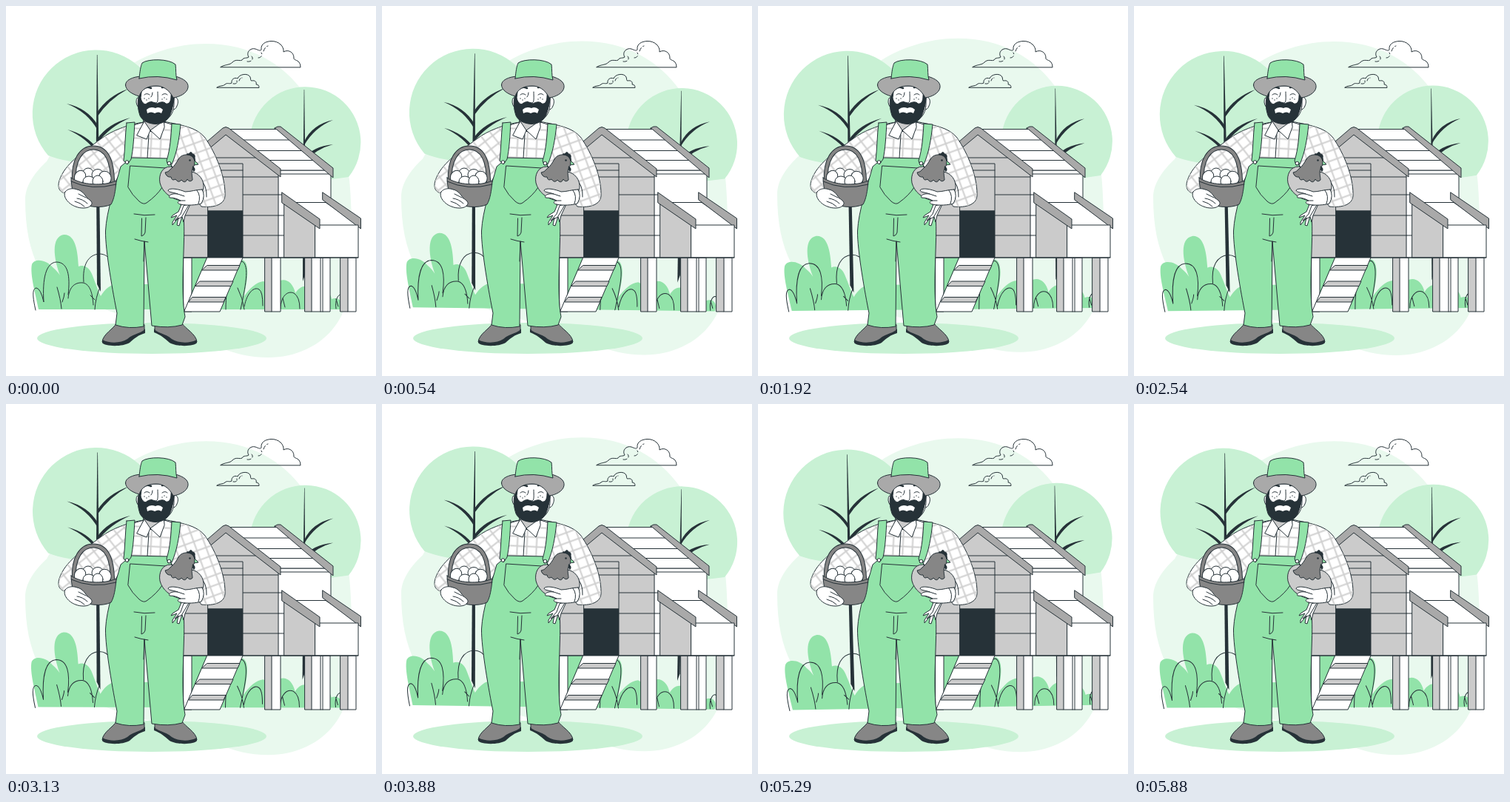
These frames come from a looping animation (500 px wide and 500 px high, 5.93 s). An HTML page:

```html
<!DOCTYPE html>
<html lang="en">
<head>
<meta charset="utf-8">
<title>Farmer with hen</title>
<style>
html, body { margin: 0; width: 100%; height: 100%; overflow: hidden; background: #fff; }
svg { display: block; width: 100vw; height: 100vh; fill: none; stroke: #263238; stroke-linejoin: round; stroke-linecap: round; }
.n { stroke: none; }
.mint { fill: #92e3a9; }
.pale { fill: #c8f1d4; stroke: none; }
.w { fill: #fff; }
.g1 { fill: #cbcbcb; }
.g2 { fill: #a9a9a9; }
.g3 { fill: #868686; }
.d { fill: #263238; }
</style>
</head>
<body>
<svg viewBox="0 0 500 500">
  <defs>
    <pattern id="check" width="13" height="13" patternUnits="userSpaceOnUse" patternTransform="translate(178 159) rotate(3)">
      <path d="M0 6.5H13M6.5 0V13" stroke="#cfcfcf" stroke-width="2"/>
    </pattern>
    <pattern id="checkL" href="#check" patternTransform="translate(120 190) rotate(52)"/>
    <pattern id="checkR" href="#check" patternTransform="translate(262 190) rotate(-20)"/>
  </defs>

  <path id="blob" class="n" fill="#e9f9ee" d="M270 51C330 51 375 78 403 118C435 160 460 200 464 235C467 265 468 310 466 350C466 390 458 415 445 432C425 460 390 475 355 475C300 475 280 452 225 437C165 420 90 405 45 355C32 330 26 300 26 262C26 243 38 226 55 210C90 150 110 120 160 85C190 64 230 51 270 51Z"/>

  <g id="plants">
    <path class="pale" d="M57 202A86 86 0 1 1 189 199Q170 213 123 214Q80 211 57 202Z"/>
    <path class="pale" d="M345 230A75 75 0 1 1 463 231Q450 233 440 234Z"/>
    <path class="mint n" d="M44 410C40 390 32 362 35 349C39 340 55 343 63 353C68 357 71 361 73 364C64 340 61 312 78 309C95 308 97 335 98 352C104 349 112 352 116 362C121 374 124 384 128 392C134 382 142 376 149 376H236V340H272L290 380C300 364 307 346 319 343C330 346 327 370 321 393C330 381 338 373 348 372L361 379C371 364 387 369 391 388C399 375 412 375 421 392C427 380 438 384 440 396C450 392 456 400 452 410Z"/>
    <path d="M40 411C36 393 35 382 41 381Q47 382 51 400C49 368 54 347 68 346C84 346 87 365 84 390M75 409Q74 397 69 380M76 400Q79 392 79 388M84 395C85 381 92 373 104 374C114 376 117 389 118 404M105 373C103 350 111 336 126 335C141 335 147 350 147 370M120 410Q121 394 127 380M120 397L114 391"/>
    <path d="M297 410C297 375 305 348 319 345C330 350 323 382 317 410M322 410Q320 395 313 381M322 406C326 386 336 379 342 383Q347 386 347 405M371 409C371 393 380 384 389 388Q397 393 397 409M377 407L374 395M446 409C444 396 450 387 454 391M449 406L446 396"/>
    <g class="d n">
      <path d="M122.900 66H123.500L125.500 200L128 386L123 376L121.700 200Z"/>
      <path d="M82 132Q110 138 124 161V168Q110 143 82 132ZM165 112Q137 122 123 144V150Q139 126 165 112ZM83 167Q110 174 124 194V200Q109 178 83 167ZM168 151Q137 159 123 180V186Q140 163 168 151Z"/>
      <path d="M402.700 113H403.200L404.500 230V362L401 372L401.500 220Z"/>
      <path d="M442 154Q414 160 403 183V188Q417 164 442 154ZM442 187Q414 190 403 206V211Q419 193 442 187ZM387 178Q399 184 404 195V200Q398 186 387 178Z"/>
    </g>
  </g>

  <ellipse class="pale" cx="197" cy="449" rx="155" ry="21"/>

  <path d="M290 82.500C295 79 303 80 306 76C311 71 316 75 319 73C321 69 326 71 328 69C324 63 330 56 337 58C342 60 344 61 345 59C344 51 351 48 358 47.500C369 47 376 55 375 62C382 58 389 63 389 70C388 73 394 73 396 76Q398 78 398 82.500Z"/>
  <path d="M326 75C332 76 335 71 332 68M341 70C345 70 347 66 345 63M348 61Q350 55 354 54" stroke-dasharray="5 3"/>
  <path d="M285 110C289 107 293 109 296 106C299 103 302 106 305 104C304 99 309 96 313 98C315 92 327 90 330 96C331 99 330 101 332 101C337 100 339 103 338 106Q342 106 342 110Z"/>
  <path d="M307 105Q313 106 312 101M315 101Q316 97 319 97" stroke-dasharray="4 2"/>

  <!-- coop -->
  <g>
    <path class="w" d="M240 340H251V413H240ZM359 340H371V413H359ZM413 340H438V413H413ZM462 340H473V413H462Z"/>
    <path d="M425 340V413M428 340V413"/>
    <path class="g1" d="M350 340H359V413H350ZM404 340H413V413H404ZM452 340H462V413H452Z"/>
    <path class="w" d="M368 222H439V340H368Z"/>
    <path d="M371 227H439M368 255H375M368 283H376M368 310H376"/>
    <path class="w" d="M299 166.500H367L441 222H371Z"/>
    <path d="M318 181H387M338 195.500H406M354 208.500H424"/>
    <path class="g2" d="M363 165L367 163H371L442 219V232L366 167Z"/>
    <path class="g1" d="M238 220L297 172L368 226V340H238Z"/>
    <path d="M257 205H340M320 231H368M320 255H368M320 283H368M320 310H368M238 283H273M238 310H273"/>
    <path class="g1" d="M273 213H320V277H273Z"/>
    <path d="M273 222H320M273 231H320"/>
    <path class="d" d="M273 277H320V340H273Z"/>
    <path class="g2" d="M237 213L293 165Q297 162 301 165L371 220V231L297 174L237 224Z"/>
    <path class="w n" d="M376 254H430V275H376Z"/>
    <path class="w" d="M391 265.500H432L478 296.500H424Z"/>
    <path class="g2" d="M428 252L479.500 287V301L428 262Z"/>
    <path class="g1" d="M376 266L418 296V340H376Z"/>
    <path class="w" d="M418 296H476V340H418Z"/>
    <path class="g2" d="M373 252L424 288V301L373 266Z"/>
    <path d="M238 340H476"/>
    <path class="w" d="M272 340H320L289 413H241Z"/>
    <path class="g1" d="M272 350.500H316L313 357H265ZM262 372H307L304 378.500H256ZM252 393.500H297L294 400H247Z"/>
  </g>

  <!-- shoes -->
  <g>
    <path class="g3" d="M149 429C146 436 131 443 130 454C143 460 157 458 166 452C174 444 187 444 187 437V431Z"/>
    <path class="d n" d="M130 451C142 457 156 455 164 450C173 442 185 442 188 436V442C178 445 174 449 167 455C157 461 133 460 130 455Z"/>
    <path class="g3" d="M238 429C242 436 257 443 258 454C245 460 231 458 222 452C214 444 201 444 201 437V431Z"/>
    <path class="d n" d="M258 451C246 457 232 455 224 450C215 442 203 442 200 436V441C210 445 214 449 221 455C231 461 255 460 258 455Z"/>
  </g>

  <!-- shirt -->
  <g>
    <path class="w" d="M186 157C165 160 142 169 129 179C104 198 80 212 72 236C69 246 73 252 80 253L140 252L161 213L168 170Z"/>
    <path class="n" fill="url(#checkL)" d="M168 161C155 165 138 172 129 179C104 198 80 212 72 236C69 246 73 252 80 253L140 252L161 213Z"/>
    <path class="w" d="M213 156C238 161 258 164 269 178C284 200 296 230 296 254C297 268 282 273 264 271L240 240L222 213Z"/>
    <path class="n" fill="url(#checkR)" d="M229 160C244 162 260 167 269 178C284 200 296 230 296 254C297 268 282 273 264 271L240 240L222 213Z"/>
    <path class="w n" d="M165 163L186 157H214L234 163L222 212H160Z"/>
    <path class="n" fill="url(#check)" d="M165 163L186 157H214L234 163L222 212H160Z"/>
    <path d="M165 163L186 157M214 157L234 163M193 174L191 206M262 234Q272 242 271 258"/>
  </g>

  <!-- overalls -->
  <g>
    <path class="mint" d="M169 205L220 206L223 214C225 232 236 262 240 287C243 310 235 385 242 420L238 431Q220 436 197 432L187 318L186 433Q166 437 148 431L150 415C145 390 134 330 134.500 304C136 276 147 246 155 217L161 212Z"/>
    <path d="M168 216L216 219L211 245Q204 256 190 266Q186 269 180 264Q170 255 165 245ZM173 281Q187 284 201 282M189 286L188 306Q187 310 183 311L183.500 287M174 315Q183 318 192 319M187 318L186 345"/>
    <path class="mint" d="M163 158L174 157C173 175 172 194 169 207L164 214L159 209C161 192 161 174 163 158ZM224 159L236 160C234 180 231 198 224 214L219 215L217 209C222 193 223 176 224 159Z"/>
    <circle class="w" cx="163.500" cy="211" r="2.300"/>
    <circle class="w" cx="220.500" cy="212.500" r="2.300"/>
  </g>

  <!-- head -->
  <g>
    <path class="g1" d="M186 147H214V158L196 170L186 160Z"/>
    <path class="w" d="M187 156L195 168L190 180L177 175ZM213 155L195 168L208 180L214 164Z"/>
    <path class="w" d="M226 124C232 121 234 129 231 135Q229 141 224 140ZM180 124Q176 122 176 130Q177 137 181 138Z"/>
    <path class="w" d="M180 108H227V132C227 148 217 157 203 157C189 157 180 148 180 132Z"/>
    <path class="d" d="M180 109H184L182 124C183 130 187 134 190 132C194 128 200 130 204 132C209 129 214 129 216 132C221 133 223 128 223 122L224 109H227C229 124 225 140 221 149C216 157 210 159 202 159.500C192 159 184 155 181 148C178 139 177 129 180 120Z"/>
    <path class="w n" d="M190 140Q195 135 202 138Q207 135 212 140L210 145Q206 142 201 145Q196 142 191 145Z"/>
    <path d="M205 116C205 123 206 130 203 131Q199 132 196 129M198 117Q198 121 196 123"/>
    <path d="M185 112Q190 108 196 111M211 110Q217 108 223 112" stroke-width="2.600"/>
    <path d="M187 120Q190 117 194 120M211 120Q215 117 218 120"/>
    <g class="d n">
      <circle cx="187" cy="125" r=".7"/><circle cx="190" cy="127" r=".7"/><circle cx="193" cy="125" r=".7"/>
      <circle cx="211" cy="126" r=".7"/><circle cx="214" cy="124" r=".7"/><circle cx="217" cy="126" r=".7"/>
    </g>
    <path class="g2" d="M161.500 107C161 100 171 96 182 95H229C240 98 247 103 246 110C245 118 234 123 226 124C220 112 211 108 203 108C192 108 183 112 180 122C170 119 162 114 161.500 107Z"/>
    <path class="mint" d="M180 98C181 88 182 81 184 77C192 71 220 71 229 79C230 86 229 93 231 100Q205 92 180 98Z"/>
  </g>

  <!-- basket -->
  <g>
    <path d="M92 237C90 208 102 191.500 118 191.500C137 191.500 144 211 144 240" stroke-width="6"/>
    <path d="M92 237C90 208 102 191.500 118 191.500C137 191.500 144 211 144 240" stroke="#868686" stroke-width="4"/>
    <g class="w">
      <ellipse cx="111" cy="227" rx="7.500" ry="8"/>
      <ellipse cx="124" cy="228" rx="8" ry="7.500"/>
      <ellipse cx="100" cy="231" rx="7.500" ry="9" transform="rotate(25 100 231)"/>
      <ellipse cx="134" cy="232" rx="8" ry="9" transform="rotate(-25 134 232)"/>
      <ellipse cx="112" cy="237" rx="8" ry="7"/>
      <ellipse cx="124" cy="237" rx="7" ry="8"/>
    </g>
    <path class="g3" d="M88 232C101 242 132 244 149 236C148 250 146 261 142 268C131 274 107 272 96 264C91 256 88 243 88 232Z"/>
    <path d="M88 237Q116 250 149 241"/>
    <path class="w" d="M80 251C84 246 91 246 96 248C102 249 106 254 110 260C114 262 118 266 115 269C112 274 101 274 94 271C85 268 76 258 80 251Z"/>
    <path d="M96 260Q104 261 110 267M93 264Q101 266 106 271M98 254L108 259"/>
  </g>

  <!-- hen -->
  <g>
    <path class="w" d="M238 266L233 278L225 283L223 286L231 283L225 292V296L233 286L231 296L234 297L238 284L247 269ZM240 270L236 281L228 290L238 285L240 292L242 283L249 268Z"/>
    <path class="g1" d="M222 217C211 217 206 228 208 239C211 251 222 260 236 263C251 266 264 259 267 246C268 235 261 226 251 224Z"/>
    <path class="d" d="M244 205Q243 198 247 200Q250 195 252 200Q256 200 255 205L256 212Z"/>
    <path class="mint" d="M254 208L260 214L254 215Z"/>
    <path class="g3" d="M233 207C236 201 245 199 251 203C257 208 255 216 252 220C250 226 252 231 252 235Q248 239 245 234Q242 241 237 235Q233 240 229 234Q224 237 223 231Q217 232 215 225Q219 225 223 220C228 216 230 212 233 207Z"/>
    <circle class="d n" cx="248.500" cy="208.500" r="1.300"/>
    <path class="d n" d="M252 216Q258 220 254 224Q251 222 252 216Z"/>
    <path class="w" d="M265 248C257 248 250 251 242 251C235 248 222 245 219 249C219 252 228 252 232 254C224 253 219 256 221 259C228 259 232 261 236 263C231 264 231 267 236 268C245 270 257 269 264 267Q270 256 265 248Z"/>
    <path d="M232 254L241 257M236 263L242 263M258 249Q264 257 260 267"/>
  </g>
</svg>
<script>
const LOOP = 5930, PERIOD = 3000, STEP = 1000 / 24;
const blob = document.getElementById('blob');
const plants = document.getElementById('plants');

const sway = p => p < .25 ? 4 * p : p < .75 ? 2 - 4 * p : 4 * p - 4;
const lift = p => 10 * (1 - Math.abs(2 * p - 1));

// The picture advances at 24 steps per second.
function draw(now) {
  const t = Math.floor((now % LOOP + 5) / 41.7) * STEP;
  const p = t % PERIOD / PERIOD;
  blob.setAttribute('transform', `translate(0 ${-lift(p)})`);
  plants.setAttribute('transform', `rotate(${sway(p)} 256 235)`);
}

const start = performance.now();
function tick() {
  draw(performance.now() - start);
  requestAnimationFrame(tick);
}
tick();
</script>
</body>
</html>
```
